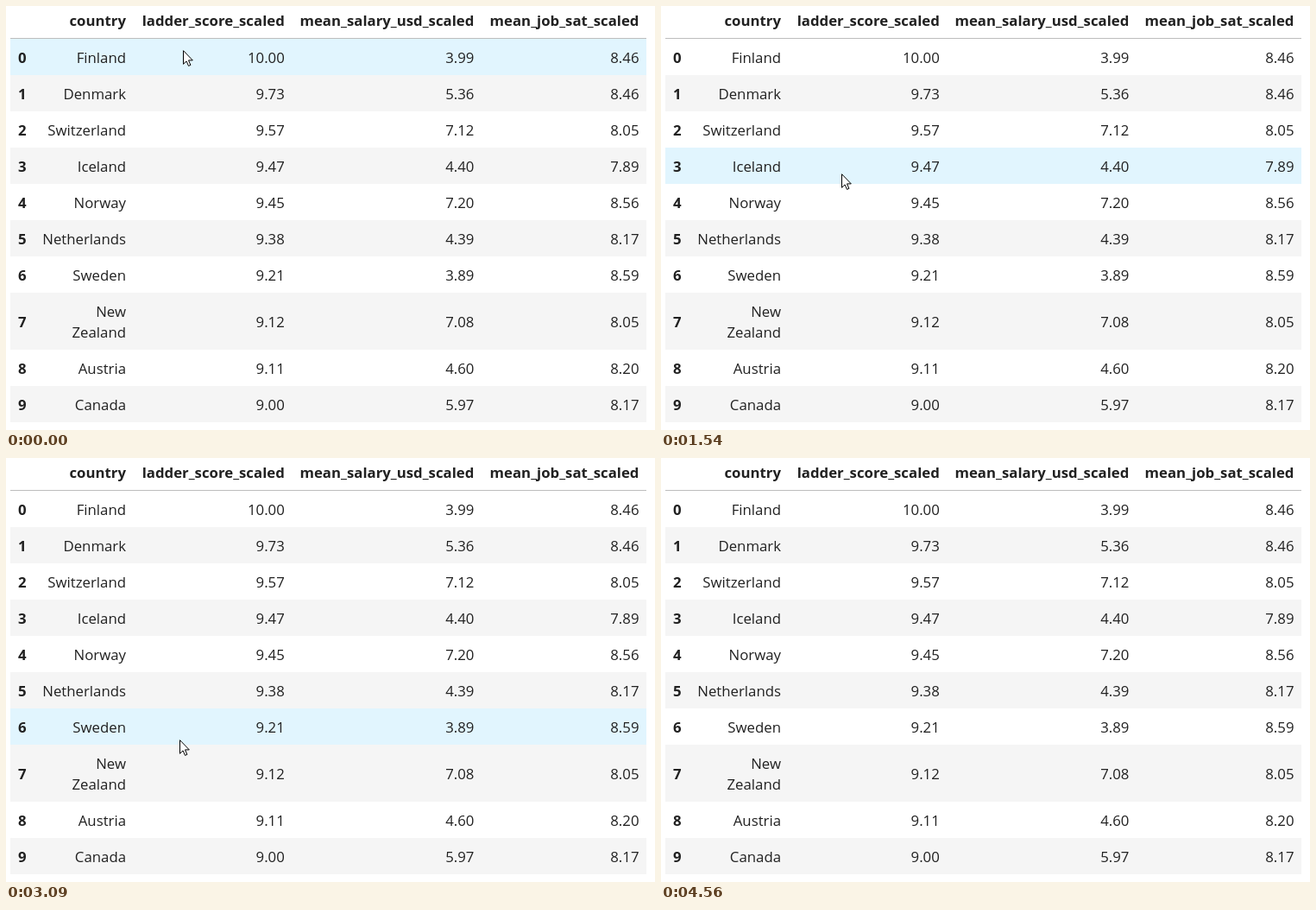
Write an HTML page that moves like this. It is 752 px wide and 491 px high and loops after 4.66 s.

```html
<!DOCTYPE html>
<html lang="en">
<head>
<meta charset="utf-8">
<title>Table row hover</title>
<style>
html, body { margin: 0; width: 100%; height: 100%; overflow: hidden; background: #fff; }
svg { display: block; width: 752px; height: 491px; }
text { font: 16.8px "Open Sans", "Noto Sans", sans-serif; fill: #212121; text-anchor: end; }
.bold { font-weight: 700; }
</style>
</head>
<body>
<svg id="stage" viewBox="0 0 752 491"></svg>
<script>
const stage = document.getElementById("stage");
const heads = ["country", "ladder_score_scaled", "mean_salary_usd_scaled", "mean_job_sat_scaled"];
const data = `Finland 10.00 3.99 8.46
Denmark 9.73 5.36 8.46
Switzerland 9.57 7.12 8.05
Iceland 9.47 4.40 7.89
Norway 9.45 7.20 8.56
Netherlands 9.38 4.39 8.17
Sweden 9.21 3.89 8.59
New_Zealand 9.12 7.08 8.05
Austria 9.11 4.60 8.20
Canada 9.00 5.97 8.17`.split("\n").map(line => line.split(" "));
const right = [139, 322.8, 542.4, 733.5];

function add(tag, attrs, content = "") {
  const el = document.createElementNS("http://www.w3.org/2000/svg", tag);
  for (const key in attrs) el.setAttribute(key, attrs[key]);
  el.textContent = content;
  return stage.appendChild(el);
}
const label = (str, x, y, cls = "") => add("text", { x, y, class: cls }, str);

heads.forEach((head, i) => label(head, right[i], 23, "bold"));
add("path", { d: "M5 37.5H742", stroke: "#bdbdbd" });

let rowY = 38;
const rows = data.map((cells, i) => {
  const y = rowY;
  const height = cells[0].includes("_") ? 66 : 42;
  const mid = y + height / 2 + 7;
  const rect = add("rect", { x: 5, y, width: 737, height });
  label(i, 23.5, mid, "bold");
  cells.forEach((cell, c) => {
    const lines = cell.split("_");
    lines.forEach((line, k) => label(line, right[c], mid + 24 * k - 12 * (lines.length - 1)));
  });
  rowY += height;
  return { rect, y, height, base: i % 2 ? "#f5f5f5" : "#fff" };
});

const cursor = add("path", {
  d: "M.5 .7V16.3L4.1 12.9L6.5 18.4L8.9 17.4L6.5 11.9H11.3Z",
  fill: "#fff", stroke: "#000"
});

// Pointer moves: first and last step in ms, resting y afterwards
const moves = [
  [70, 430, 96], [590, 890, 132], [1030, 1330, 181], [1540, 1840, 229], [1980, 2360, 260],
  [2560, 2780, 291], [3030, 3230, 347], [3460, 3830, 421], [4050, 4270, 456], [4420, 4560, 500]
];
const LOOP = 4660, STEP = 74;

function pointerY(t) {
  let y = 51;
  for (const [first, last, end] of moves) {
    if (t < first) break;
    const gaps = Math.round((last - first) / STEP);
    const done = Math.floor((t - first) / (last - first) * gaps + 1.2);
    const p = Math.min(1, done / (gaps + 1));
    y += (end - y) * (1 - (1 - p) ** 1.4);
  }
  return Math.round(y);
}

// Drifts right down to y = 130, then left again
const pointerX = y => Math.round(y < 130 ? 205 + (y - 51) / 18 : Math.max(201, 209 - Math.max(0, y - 195) / 9));

function draw(now) {
  const y = pointerY(now % LOOP);
  cursor.setAttribute("transform", `translate(${pointerX(y)} ${y})`);
  for (const row of rows) {
    const over = y > row.y && y <= row.y + row.height;
    row.rect.setAttribute("fill", over ? "#e1f5fe" : row.base);
  }
}

const start = performance.now();
function tick() {
  draw(performance.now() - start);
  requestAnimationFrame(tick);
}
tick();
</script>
</body>
</html>
```
